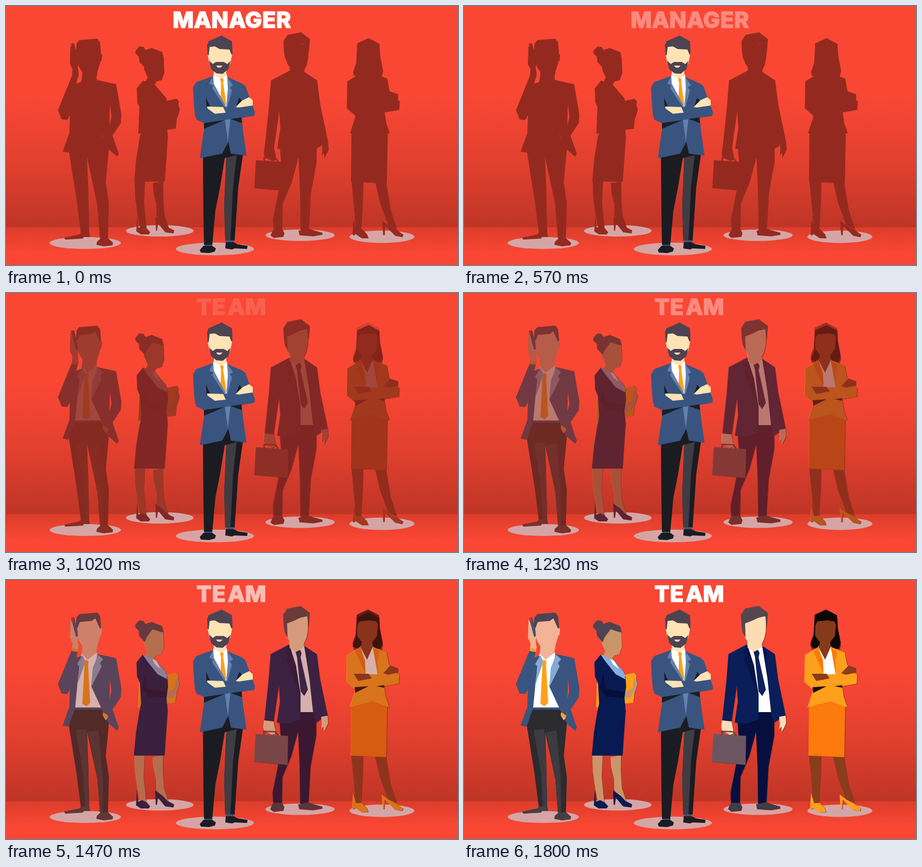
An HTML page for the animation above (3.3 s loop, 870 px wide and 500 px high).

```html
<!DOCTYPE html>
<html lang="en">
<head>
<meta charset="utf-8">
<title>From manager to team</title>
<style>
html, body { margin: 0; width: 100%; height: 100%; overflow: hidden; background: #f94734; }
svg { display: block; width: 100%; height: 100%; }
text {
  font: 800 43px Inter, "Open Sans", sans-serif;
  text-anchor: middle; fill: #fff; stroke: #fff; stroke-width: 1.6; stroke-linejoin: round;
}
.shade * { fill: #942a1f; }
.shade .line { fill: none; stroke: #942a1f; }
.line { fill: none; stroke: #574650; stroke-width: 2.5; }
#color, #team { opacity: 0; }
</style>
</head>
<body>
<svg viewBox="0 0 870 500">
  <defs>
    <linearGradient id="wall" x2="0" y2="1">
      <stop offset=".41" stop-color="#f94734"/>
      <stop offset=".7" stop-color="#e3402f"/>
      <stop offset="1" stop-color="#be3526"/>
    </linearGradient>
    <linearGradient id="floor" x2="0" y2="1">
      <stop stop-color="#dc3c2b"/>
      <stop offset=".65" stop-color="#f94734"/>
    </linearGradient>
  </defs>
  <rect width="870" height="428" fill="url(#wall)"/>
  <rect y="427" width="870" height="73" fill="url(#floor)"/>
  <g fill="#d5a5a5">
    <ellipse cx="152.5" cy="457.5" rx="68.5" ry="11.5"/>
    <ellipse cx="296" cy="434" rx="65" ry="11"/>
    <ellipse cx="402" cy="469" rx="75" ry="12.3"/>
    <ellipse cx="566" cy="442.5" rx="66.5" ry="11"/>
    <ellipse cx="723.5" cy="445.5" rx="62.5" ry="12"/>
  </g>

  <g id="shades"></g>

  <g id="color">
    <!-- man on the phone -->
    <g class="person">
      <path fill="#2c2b2e" d="M121 281 131 249H184L198 277 192 340 198 380 196 450 181 449 176 385 156 292 158 345 160 437 144 438 136 375z"/>
      <path fill="#3d3b41" d="M134 290 154 288 158 345 160 437 152 437 148 370z"/>
      <path fill="#3d3b41" d="M158 294 178 290 186 380 187 449H181L176 385z"/>
      <path fill="#454045" d="M112 447 141 441 145 437 160 436 162 446 150 446 148 449 114 451zM182 449 196 448 206 457 205 462 188 464 174 461 175 455z"/>
      <path fill="#fff" d="M147 137 156 152 175 140 180 170 184 247H132L140 160z"/>
      <path fill="#39547f" d="M132 246H184V250H131z"/>
      <path fill="#f2b08d" d="M124 76 129 84 132 92 138 95 140 108 138 118 140 131 138 136 127 133 128 122 123 112z"/>
      <path fill="#39547f" d="M125 73 131 72 138 98 139 108 135 110z"/>
      <path fill="#d9312f" d="M125 73 129 72 130 82 127 82z"/>
      <path fill="#ffa01a" d="M128 131 140 134 138 140 126 137z"/>
      <path fill="#39547f" d="M126 137 138 139 135 150 147 146 142 162 137 206 133 248 120 283 109 281 122 245 123 211 118 220 107 219 100 201z"/>
      <path fill="#39547f" fill-rule="evenodd" d="M176 143 212 151 222 209 221 226 205 250 217 285 214 291 198 277 184 248 180 240 164 205zM200 190 203 214 199 230z"/>
      <path fill="#86a9d2" d="M147 145 137 162 142 168 136 206 153 157zM177 144 187 153 181 160 184 167 164 207 167 170z"/>
      <path fill="#ffa01a" d="M151 157 154 154 159 157 158 164 162 237 155 244 147 239 151 164zM187 255 197 262 195 268 186 261z"/>
      <path fill="#f2b396" d="M186 261 195 267 192 271zM137 90 141 80 172 71 181 92 185 94 184 106 182 107 176 127 174 140 157 154 146 142 147 128 140 117 138 105z"/>
      <path fill="#4d4351" d="M134 91 136 72 141 66 176 63 181 70 183 92 181 94 172 74 165 79 142 81 138 92z"/>
    </g>

    <!-- woman with a folder -->
    <g class="person" data-shift="0.7 0">
      <path fill="#c9966a" d="M247 338H267L265 380 270 430 258 430 253 405 248 370zM282 342 302 338V370L304 402 313 429 303 428 289 405 289 385 283 360z"/>
      <path fill="#071a52" d="M252 404 254 428 262 425 270 429 277 437 274 441 259 441 250 435zM287 406 302 417 311 427 323 433 322 439 306 437 292 420 290 434 288 434z"/>
      <path fill="#ffa01a" d="M309 183 328 179 332 184 326 237 309 239zM256 197 266 200V242L254 247z"/>
      <path fill="#071a52" d="M257 252H311L305 339H246L250 295z"/>
      <path fill="#071a52" d="M263 144 251 159 252 186 258 200 260 238 257 255H311L309 227 312 206 311 187 281 153z"/>
      <path fill="#050f38" d="M268 180 272 210 309 216 309 228 274 225 262 208z"/>
      <path fill="#86b0e0" d="M263 144 284 150 308 178 311 192 292 182 272 157z"/>
      <path fill="#fff" d="M280 150 290 157 298 172 287 163z"/>
      <path fill="#c9966a" d="M311 216 325 208 326 192 331 190 334 200 330 214 320 228 309 229zM268 98 290 93 303 101 304 130 299 143 289 146 284 154 268 146 272 138 265 122z"/>
      <path fill="#4d4351" d="M248 91 249 86 256 78 264 79 268 85 280 81 300 89 303 101 297 100 282 95 270 112 267 120 256 108 255 98z"/>
    </g>

    <!-- man with a briefcase -->
    <g class="person" data-shift="1 .7">
      <path fill="#070f3f" d="M526 270 567 253H591L597 275V300L586 360 582 432H566L565 360 562 292 549 340 532 380 531 431H514L513 410 524 355 530 320z"/>
      <path fill="#3f3c46" d="M508 442 514 430H531L535 438 533 445 514 447zM562 433 582 429 590 432 608 437V441L590 444 564 442z"/>
      <path fill="#fff" d="M545 123 558 138 574 126 584 150 592 255H567L566 220 545 140z"/>
      <path fill="#fddcb4" d="M497 270 515 272 517 283 520 296 512 299 497 291 495 284zM606 263 619 261 620 277 612 293 611 283 607 288 608 276z"/>
      <path fill="#0a1e5a" d="M545 124 509 143 505 195 497 271 515 273 525 203 527 235 521 275 545 277 567 269V220L558 165zM574 127 598 143 604 190 619 262 607 264 606 269 597 275 591 255 584 190z"/>
      <path fill="#081445" d="M545 124 537 140 544 146 539 152 566 222 558 165zM574 127 583 142 580 150 589 215 584 180z"/>
      <path fill="#0c2258" d="M557 138 566 135 569 141 567 149 581 212 574 224 567 215 560 148z"/>
      <path fill="#6b5660" d="M480 297 543 301 542 357 477 351z"/>
      <path class="line" d="M496 299V292L518 293 523 300"/>
      <path fill="#fddcb4" d="M540 82 556 76 581 69V98L578 113 573 124 574 129 558 139 546 131 545 117 540 110z"/>
      <path fill="#55464f" d="M534 87 533 67 541 55 567 50 584 63 582 92 580 70 568 72 556 78 541 84 542 112 536 100z"/>
    </g>

    <!-- woman with folded arms -->
    <g class="person" data-shift="1 .6">
      <path class="hair" fill="#0e0707" d="M675 67 697 57 718 68 719 90 725 121 722 132 713 134 704 126 686 129 678 133 668 129 667 122 673 105z"/>
      <path fill="#8a3d1b" d="M664 338H687L686 380 683 431 672 432 670 400zM710 341 731 341 740 395 752 431 735 423 719 380z"/>
      <path fill="#ffa01c" d="M668 411 674 431 684 430 694 440 697 448H684L672 440 668 443 666 440zM723 414 736 424 750 431 764 441 762 446 748 443 729 424 728 442 725 442z"/>
      <path fill="#fd7a0c" d="M664 240 705 230 734 240 732 342 663 339z"/>
      <path fill="#fff" d="M682 126 695 150 706 127 716 160V184H690z"/>
      <path fill="#ffa01c" d="M682 129 656 145 655 197 672 212 661 246 705 234 738 246 731 226 728 205 756 200 757 184 737 163 733 140 706 129 715 182H692z"/>
      <path fill="#fd7a0c" d="M682 130 672 138 678 150 692 181 691 155zM706 130 719 139 715 154 716 180z"/>
      <path fill="#8a3d1b" d="M669 181 698 181 704 190 678 195zM726 180 740 165 754 170V179L735 183z"/>
      <path fill="#1a0d10" d="M671 207 698 205 672 218zM713 205 728 203V208z"/>
      <path fill="#863a1a" d="M676 84 680 75H712L716 85 714 108 705 120 706 129 695 154 683 131 685 120 676 108z"/>
      <path class="hair" fill="#0e0707" d="M674 92 677 70 700 61 717 72 718 90 713 80 700 78 680 80z"/>
    </g>
  </g>

  <!-- manager -->
  <g>
    <path fill="#1b1c22" d="M379 290 416 283 428 260 433 284 456 287 447 350 440 453H422L420 385 424 293 421 294 412 350 403 395 397 462 381 461 380 400z"/>
    <path fill="#3f3d43" d="M424 293 444 288 437 350 432 453H422L420 385z"/>
    <path fill="#39547f" d="M382 461H397V464H382zM424 452H438V456H424z"/>
    <path fill="#1b1c22" d="M373 471 380 463H397L404 468 402 474 391 477 375 476zM423 456H438L446 460 465 463 464 469 440 468 435 470 422 468z"/>
    <path fill="#fff" d="M399 132 413 139 425 132 430 160 426 195H420L398 150z"/>
    <path fill="#ffe3b5" d="M388 94 391 76H433L435 95 432 110 424 126V135L415 140 400 133V124L391 108z"/>
    <path fill="#ffa01a" d="M412 142 415 138 419 142 418 148 424 189 421 194 413 176 414 148z"/>
    <path fill="#39547f" d="M399 135 366 147 360 157 362 195 364 213 382 225 381 240 373 294 416 285 428 262 433 285 463 289 456 240 454 216 478 212 479 205 474 191 461 155 455 150 426 137 428 160 425 195H421L398 150z"/>
    <path fill="#6480ad" d="M399 135 391 150 399 153 397 159 421 195H424L400 150zM426 137 437 153 431 157 435 163 426 195H424L427 160zM421 217H432L427 262z"/>
    <path fill="#1b1e27" d="M385 177 393 195H386zM449 177 454 183 443 194zM381 225 422 211 421 220 381 237zM453 213 454 226 432 218z"/>
    <path fill="#39547f" d="M364 205 388 198 402 208 423 206 443 194H474L479 210 454 215 381 226 366 219z"/>
    <path fill="#ffe3b5" d="M387 194 418 195 423 206 402 208 388 198zM442 195 455 182 468 176 475 182V192L448 196z"/>
    <path fill="#4d4351" d="M388 94 387 76 390 68 415 57 435 68 436 92 434 94 430 84 411 83 402 78 392 79 390 96zM391 105 398 112 404 108H419L426 112 432 106 428 122 417 131 405 130 395 122z"/>
    <path fill="#ffd3b5" d="M404 115H417L413 119H408z"/>
  </g>

  <text id="manager" x="434.8" y="41.5" letter-spacing=".5">MANAGER</text>
  <text id="team" x="433.5" y="41.5" dx="0 1 4">TEAM</text>
</svg>
<script>
const LOOP = 3300, FADE = 900, FRAME = 30;
const byId = id => document.getElementById(id);

// The dark silhouettes reuse the colored figures.
for (const person of document.querySelectorAll('.person')) {
  const shade = person.cloneNode(true);
  shade.setAttribute('class', 'shade');
  shade.setAttribute('transform', `translate(${person.dataset.shift || '0 0'})`);
  for (const hair of shade.querySelectorAll('.hair'))
    hair.setAttribute('transform', 'translate(0 4.5)');
  byId('shades').append(shade);
}

function fade(id, from, to, start) {
  const easing = `steps(${FADE / FRAME}, end)`;
  byId(id).animate([
    { opacity: from, offset: 0 },
    { opacity: from, offset: start / LOOP, easing },
    { opacity: to, offset: (start + FADE) / LOOP },
    { opacity: to, offset: 1 }
  ], { duration: LOOP, iterations: Infinity });
}

fade('manager', 1, 0, 0);
fade('color', 0, 1, FADE);
fade('team', 0, 1, FADE);
</script>
</body>
</html>
```
